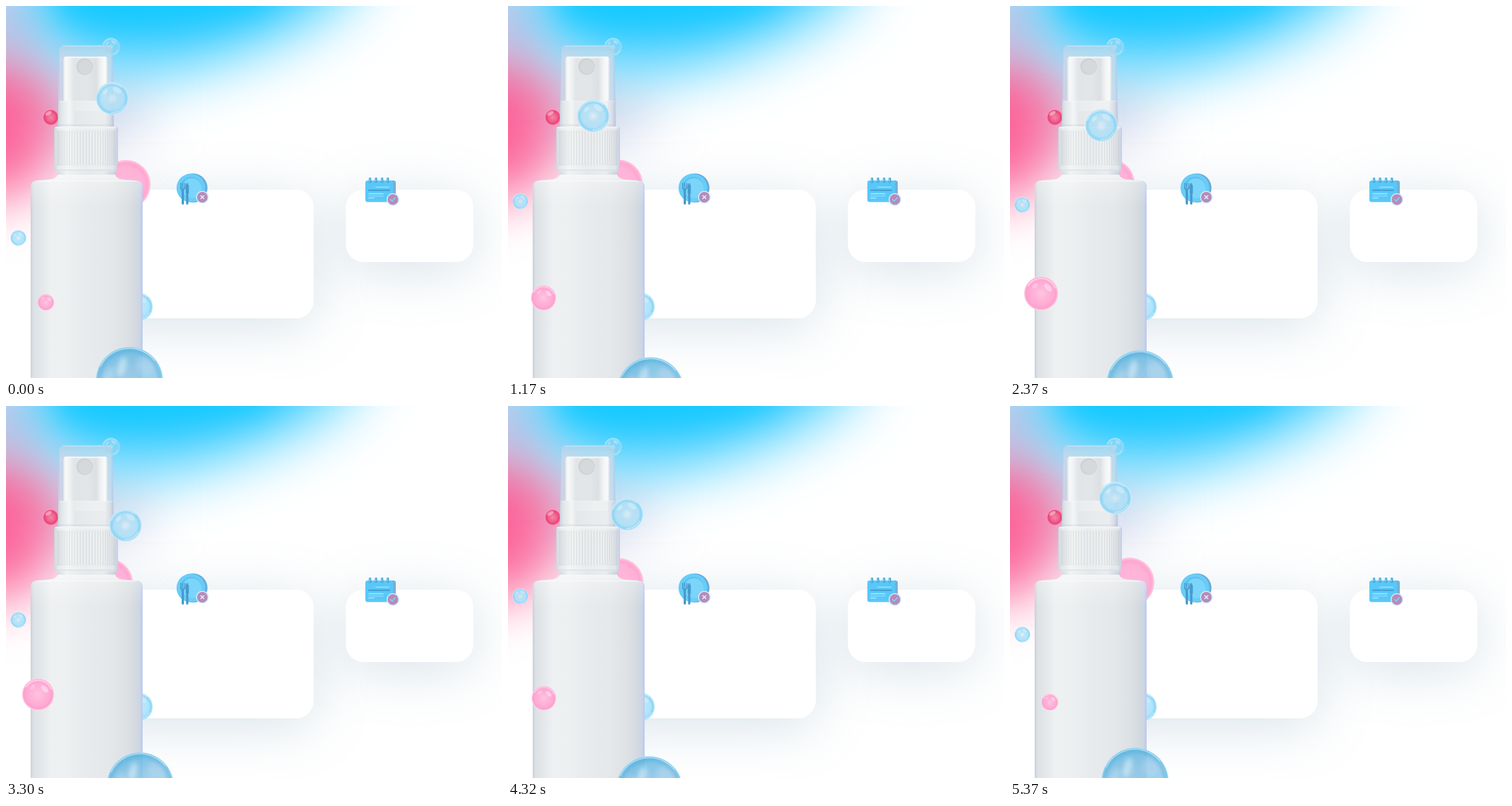
Recreate the animation shown at these times as an HTML page with a canvas. Size 864 by 648 pixels, loop 5400 ms.

```html
<!DOCTYPE html>
<html lang="en">
<head>
<meta charset="utf-8">
<title>Spray bottle and bubbles</title>
<style>
html, body { margin: 0; width: 100%; height: 100%; overflow: hidden; background: #fff; }
canvas { display: block; width: 864px; height: 648px; }
</style>
</head>
<body>
<canvas id="stage" width="864" height="648"></canvas>
<script>
const W = 864, H = 648, LOOP = 5400, STEP = 30;
const TAU = Math.PI * 2;
const stage = document.getElementById('stage').getContext('2d');

function layer(paint) {
  const c = document.createElement('canvas');
  c.width = W; c.height = H;
  paint(c.getContext('2d'));
  return c;
}

function disc(g, x, y, r, fill) {
  g.beginPath();
  g.arc(x, y, r, 0, TAU);
  g.fillStyle = fill;
  g.fill();
}

function oval(g, x, y, rx, ry, turn, fill) {
  g.beginPath();
  g.ellipse(x, y, rx, ry, turn, 0, TAU);
  g.fillStyle = fill;
  g.fill();
}

function box(g, x, y, w, h, r, fill) {
  g.beginPath();
  g.roundRect(x, y, w, h, r);
  g.fillStyle = fill;
  g.fill();
}

function poly(g, pts, fill) {
  g.beginPath();
  pts.forEach(([x, y]) => g.lineTo(x, y));
  g.closePath();
  g.fillStyle = fill;
  g.fill();
}

function line(g, pts, color, width) {
  g.beginPath();
  pts.forEach(([x, y]) => g.lineTo(x, y));
  g.strokeStyle = color;
  g.lineWidth = width;
  g.lineCap = g.lineJoin = 'round';
  g.stroke();
}

// Linear gradient between two points from [offset, colour] stops
function ramp(g, x0, y0, x1, y1, stops) {
  const grad = g.createLinearGradient(x0, y0, x1, y1);
  stops.forEach(([o, c]) => grad.addColorStop(o, c));
  return grad;
}

function glow(g, x, y, r0, r1, stops) {
  const grad = g.createRadialGradient(x, y, r0, x, y, r1);
  stops.forEach(([o, c]) => grad.addColorStop(o, c));
  return grad;
}

function backdrop(g) {
  g.fillStyle = '#fff';
  g.fillRect(0, 0, W, H);
  g.filter = 'blur(48px)';
  oval(g, 130, 180, 125, 75, 0, 'rgba(180,190,222,.55)');
  oval(g, -20, 205, 112, 135, 0, 'rgba(252,92,148,.95)');
  oval(g, 0, 20, 70, 80, 0, 'rgba(160,172,222,.75)');
  g.filter = 'blur(55px)';
  poly(g, [[30, -200], [670, -200], [585, -10], [490, 45], [400, 82], [300, 110], [200, 112], [110, 95], [55, 50]], 'rgba(40,200,255,.96)');
  g.filter = 'blur(28px)';
  poly(g, [[70, -120], [500, -120], [460, 0], [360, 22], [220, 30], [100, 22]], '#12caff');
  g.filter = 'none';
}

function cards(g) {
  const rects = [[140, 320, 396, 224], [592, 320, 222, 126]];
  g.save();
  g.shadowColor = 'rgba(110,150,175,.27)';
  g.shadowBlur = 95;
  g.shadowOffsetY = 14;
  rects.forEach(r => box(g, ...r, 31, '#fff'));
  g.restore();
  rects.forEach(r => box(g, ...r, 31, '#fff'));
}

function badge(g, x, y) {
  disc(g, x, y, 11, '#cdeaf8');
  disc(g, x, y, 9.2, '#b98ab9');
}

function plateIcon(g) {
  disc(g, 325.5, 317, 25.5, '#6aaedb');
  disc(g, 322, 317, 25, '#68cdf7');
  disc(g, 322.5, 316.5, 18.5, '#58bdec');
  disc(g, 323.5, 317.5, 17.5, '#7bd4f9');
  const steel = '#479bcd';
  [304.5, 308, 311.5].forEach(x => line(g, [[x, 309], [x, 317]], steel, 1.8));
  line(g, [[304.5, 317], [308, 321], [311.5, 317]], steel, 2.6);
  line(g, [[308, 321], [308, 344]], steel, 4);
  poly(g, [[313, 327], [313, 312], [316, 307.5], [318.5, 313], [318.5, 327]], steel);
  line(g, [[315.7, 326], [315.7, 344]], steel, 4);
  badge(g, 342, 333);
  line(g, [[339.3, 330.3], [344.7, 335.7]], '#d4f3ff', 1.8);
  line(g, [[344.7, 330.3], [339.3, 335.7]], '#d4f3ff', 1.8);
}

function calendarIcon(g) {
  box(g, 632, 304, 47, 37, 4, '#78aed8');
  box(g, 626, 304, 48, 37.5, 4, '#58c8f8');
  [634, 644.5, 655, 665].forEach(x => {
    line(g, [[x, 301], [x, 306]], '#4c9ccb', 4.4);
    line(g, [[x - .6, 301], [x - .6, 305]], '#5dcbf8', 3);
  });
  line(g, [[644, 315.5], [667, 315.5]], '#a5e4ff', 1.5);
  line(g, [[632, 321], [668, 321]], '#459fd2', 2.4);
  line(g, [[632, 327], [657, 327]], '#b5eaff', 1.5);
  line(g, [[632, 331], [657, 331]], '#8bdcff', 1.4);
  line(g, [[632, 334.5], [641, 334.5]], '#b5eaff', 1.5);
  badge(g, 674, 337);
  line(g, [[669.8, 337], [672.8, 340], [678, 334]], '#6fd4fb', 2);
}

function bottle(g) {
  // Clear cap
  g.beginPath();
  g.moveTo(90, 209);
  g.lineTo(93, 76);
  g.quadraticCurveTo(94, 68, 102, 68);
  g.lineTo(177, 68);
  g.quadraticCurveTo(185, 68, 185.5, 76);
  g.lineTo(188, 209);
  g.closePath();
  g.fillStyle = ramp(g, 90, 0, 188, 0, [
    [0, 'rgba(190,206,226,.8)'], [.05, 'rgba(210,218,232,.75)'], [.5, 'rgba(200,224,238,.7)'],
    [.93, 'rgba(208,220,234,.75)'], [1, 'rgba(172,194,226,.8)']]);
  g.fill();
  g.fillStyle = ramp(g, 0, 68, 0, 90, [[0, 'rgba(150,208,236,.6)'], [1, 'rgba(170,214,236,.1)']]);
  g.fill();
  line(g, [[100, 70], [179, 70]], 'rgba(215,238,249,.5)', 1.5);

  // Spray head
  box(g, 100, 88, 77, 84, [5, 5, 0, 0], ramp(g, 100, 0, 177, 0, [
    [0, '#e4e8ea'], [.05, '#f8f9f9'], [.13, '#f0f2f3'], [.24, '#e2e5e7'], [.55, '#e3e6e8'],
    [.74, '#dde0e3'], [.85, '#f0f2f3'], [.95, '#fafbfb'], [1, '#d8dee4']]));
  line(g, [[103, 89.5], [174, 89.5]], '#f8fafa', 2);
  disc(g, 137, 105.5, 14.5, '#cdd2d4');
  disc(g, 138, 106, 12.3, '#d5d9da');
  box(g, 91, 165, 96, 46, [3, 3, 0, 0], ramp(g, 91, 0, 187, 0, [
    [0, '#cfd7de'], [.06, '#e1e6e9'], [.2, '#f4f5f6'], [.3, '#e4e7e9'], [.6, '#e9ebed'],
    [.85, '#eaedef'], [.94, '#d9dee6'], [1, '#bdc8de']]));
  g.fillStyle = 'rgba(255,255,255,.18)';
  g.fillRect(119, 166, 55, 17);
  line(g, [[93, 166], [186, 166]], 'rgba(250,252,253,.5)', 1.2);
  line(g, [[92, 207.5], [187, 207.5]], 'rgba(175,188,200,.4)', 1.6);

  // Neck and ribbed collar
  box(g, 90, 280, 100, 26, 3, ramp(g, 90, 0, 190, 0, [
    [0, '#d6dce0'], [.15, '#f0f2f3'], [.5, '#e4e8ea'], [.8, '#e9ecee'], [1, '#c9d2dd']]));
  box(g, 84, 210, 111, 78, [4, 4, 5, 5], ramp(g, 84, 0, 195, 0, [
    [0, '#cfd8df'], [.07, '#e6eaec'], [.2, '#f3f5f5'], [.45, '#eaedee'], [.75, '#edeff0'],
    [.93, '#e2e6ea'], [1, '#c1cde2']]));
  for (let i = 0; i < 27; i++) {
    const x = 139 + 52 * Math.sin((i - 13) / 13 * 1.3);
    g.fillStyle = 'rgba(180,187,192,.32)';
    g.fillRect(x, 217, 1.5, 61);
  }
  line(g, [[87, 212], [192, 212]], '#f4f7f8', 1.6);
  line(g, [[88, 286], [191, 286]], 'rgba(195,204,210,.5)', 1.4);

  // Body
  g.beginPath();
  g.moveTo(43, 660);
  g.lineTo(43, 314);
  g.quadraticCurveTo(43, 305, 54, 304);
  g.lineTo(78, 302);
  g.quadraticCurveTo(88, 300, 90, 294);
  g.lineTo(190, 294);
  g.quadraticCurveTo(192, 300, 202, 302);
  g.lineTo(227, 304);
  g.quadraticCurveTo(238, 305, 238, 314);
  g.lineTo(238, 660);
  g.closePath();
  g.fillStyle = ramp(g, 43, 0, 238, 0, [
    [0, '#c8cfda'], [.025, '#dce1e5'], [.1, '#e4e8ea'], [.18, '#eef0f2'], [.32, '#edf0f1'],
    [.5, '#e8ebed'], [.7, '#e5e8ea'], [.85, '#dde1e4'], [.94, '#d3d9df'], [.975, '#ccd5e6'], [1, '#b9c8ec']]);
  g.fill();
  g.save();
  g.clip();
  g.fillStyle = ramp(g, 0, 294, 0, 350, [[0, 'rgba(255,255,255,.55)'], [.25, 'rgba(255,255,255,.25)'], [1, 'rgba(255,255,255,0)']]);
  g.fillRect(43, 290, 195, 60);
  g.restore();
  line(g, [[55, 305], [226, 305]], 'rgba(252,253,253,.5)', 2);
}

// Glassy ball: tint is the body colour, rim the saturated edge
function bubble(g, x, y, r, tint, rim, alpha) {
  const c = (rgb, a) => `rgba(${rgb},${a})`;
  disc(g, x, y, r, glow(g, x, y, 0, r, [
    [0, c('222,236,244', alpha * .85)], [.35, c(tint, alpha * .9)], [.7, c(tint, alpha)],
    [.87, c(rim, alpha)], [.95, c(tint, alpha)], [1, c('225,246,255', alpha * .8)]]));
  g.lineCap = 'round';
  g.lineWidth = r * .07;
  g.strokeStyle = 'rgba(240,251,255,.45)';
  g.beginPath();
  g.arc(x, y, r * .9, 3.5, 5.4);
  g.stroke();
  g.beginPath();
  g.arc(x, y, r * .87, .5, 1.6);
  g.stroke();
  oval(g, x + r * .3, y - r * .5, r * .3, r * .17, .6, 'rgba(255,255,255,.25)');
  oval(g, x - r * .42, y - r * .4, r * .2, r * .1, -.8, 'rgba(255,255,255,.28)');
}

function pinkBall(g, x, y, r) {
  disc(g, x, y, r, glow(g, x, y, 0, r, [
    [0, '#ffc6e1'], [.35, '#ffb5d9'], [.7, '#ffabd4'], [.88, '#fd9fcd'], [.96, '#ffc2df'], [1, 'rgba(255,225,240,.85)']]));
  g.lineCap = 'round';
  g.lineWidth = r * .08;
  g.strokeStyle = 'rgba(255,236,246,.6)';
  g.beginPath();
  g.arc(x, y, r * .87, 3.7, 5.9);
  g.stroke();
  oval(g, x + r * .4, y - r * .35, r * .28, r * .15, .8, 'rgba(255,238,247,.5)');
  oval(g, x - r * .35, y - r * .45, r * .2, r * .12, -.7, 'rgba(255,230,243,.35)');
}

function bigBall(g, x, y, r) {
  disc(g, x, y, r, ramp(g, x - 15, y - r, x + 15, y + r, [
    [0, 'rgba(96,184,226,.9)'], [.16, 'rgba(116,190,228,.88)'], [.36, 'rgba(142,197,230,.88)'],
    [.6, 'rgba(140,202,234,.85)'], [1, 'rgba(100,190,230,.85)']]));
  disc(g, x, y, r, glow(g, x, y, r * .78, r, [
    [0, 'rgba(70,165,215,0)'], [.6, 'rgba(70,170,218,.35)'], [.88, 'rgba(120,205,243,.5)'], [1, 'rgba(225,246,255,.8)']]));
  g.save();
  g.beginPath();
  g.arc(x, y, r, 0, TAU);
  g.clip();
  g.filter = 'blur(4px)';
  oval(g, x - 13, y - 24, 7, 18, .25, 'rgba(232,246,253,.55)');
  oval(g, x + 27, y - 24, 13, 18, -.5, 'rgba(195,224,242,.35)');
  oval(g, x - 37, y - 4, 7, 22, .35, 'rgba(205,234,249,.35)');
  g.restore();
  g.lineWidth = 1.6;
  g.strokeStyle = 'rgba(240,250,255,.5)';
  g.beginPath();
  g.arc(x, y, r - 2.5, 3.6, 5.6);
  g.stroke();
}

function rosyDisc(g, x, y) {
  disc(g, x, y, 43, glow(g, x, y, 0, 43, [
    [0, '#ffb8da'], [.7, '#ffb1d6'], [.87, '#ffa6d0'], [.95, '#ffbbda'], [1, '#ffd0e5']]));
}

const BLUE = '176,223,245', CYAN = '132,212,247';

const base = layer(g => {
  backdrop(g);
  cards(g);
  plateIcon(g);
  calendarIcon(g);
});

const front = layer(g => {
  disc(g, 78, 194, 14, glow(g, 78, 194, 0, 14, [
    [0, '#f583a6'], [.5, '#f0648f'], [.82, '#ea4279'], [1, '#f7a0ba']]));
  oval(g, 74, 187, 6, 3, -.5, 'rgba(255,200,216,.6)');
  bubble(g, 183, 71, 15.5, '140,214,244', '160,224,247', .6);
  bubble(g, 231, 524, 25, '172,226,250', CYAN, .95);
  bottle(g);
  // The part of the clear ball that shows through the cap
  g.globalAlpha = .4;
  bubble(g, 183, 71, 15.5, '150,212,238', '150,215,240', .6);
  g.globalAlpha = 1;
});

// Straight moves between evenly spaced stops over the loop
function along(stops, u) {
  const s = u * (stops.length - 1), i = Math.floor(s);
  return stops[i] + (stops[i + 1] - stops[i]) * (s - i);
}

function draw(ms) {
  const u = Math.floor(ms % LOOP / STEP) * STEP / LOOP;
  const g = stage;
  g.drawImage(base, 0, 0);
  rosyDisc(g, along([209, 169.5, 209], u), along([311, 309, 307], u));
  g.drawImage(front, 0, 0);

  bubble(g, 21.5, along([404, 314, 401.5, 314.5, 401.5, 314, 401], u), 13.8, '172,226,250', CYAN, .95);
  const d = along([29, 64, 29], u);
  pinkBall(g, 84 - d / 2, 530.5 - d / 2, d / 2);
  bubble(g, along([185, 129, 224, 182.5], u), along([161, 208, 208, 159.5], u), 28.5, BLUE, CYAN, .92);
  bigBall(g, along([215, 253.5, 218, 253.5, 217], u), along([652.5, 673, 653.5, 672.5, 653.5], u), 58.5);
}

let start;
function tick(now) {
  if (start === undefined) start = now;
  draw(now - start);
  requestAnimationFrame(tick);
}
draw(0);
requestAnimationFrame(tick);
</script>
</body>
</html>
```
